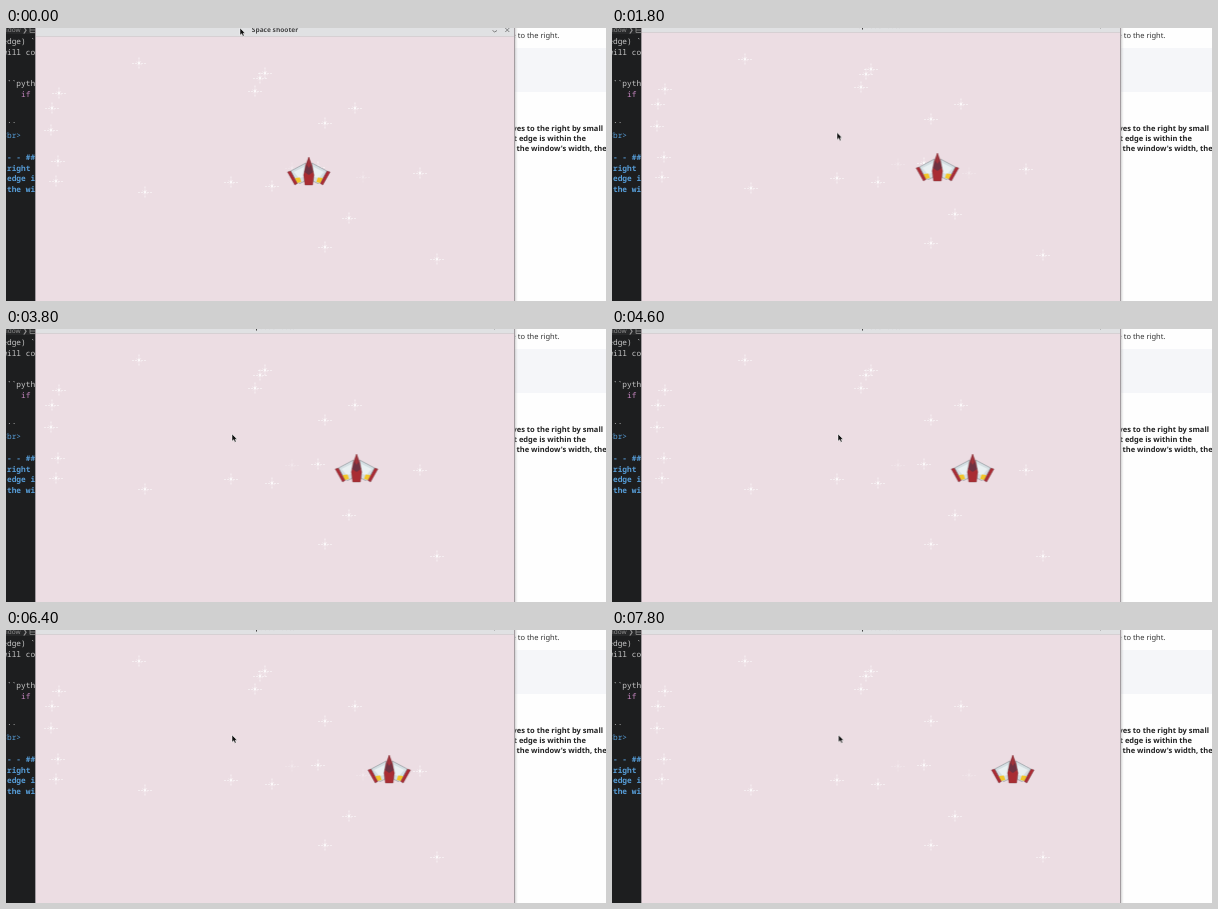
Write an HTML page that moves like this. It is 600 px wide and 273 px high and loops after 8000 ms.

```html
<!DOCTYPE html>
<html lang="en">
<head>
<meta charset="utf-8">
<title>Space shooter</title>
<style>
  html, body { margin: 0; width: 100%; height: 100%; overflow: hidden; background: #fefefe; }
  svg { display: block; width: 100vw; height: 100vh; }
  text { white-space: pre; text-rendering: geometricPrecision; }
  .code { font: 7.8px "Noto Sans Mono", monospace; fill: #c8c8c8; }
  .blue { fill: #569cd6; }
  .strong { font-weight: bold; }
  .prose { font: 7.52px "Noto Sans", sans-serif; fill: #333; }
  .prose .strong { fill: #222; }
  .title { font: bold 6.6px "Noto Sans", sans-serif; fill: #444; }

  .window { animation: drag 8s step-end infinite; }
  .ship { animation: fly 8s steps(40, end) infinite; }
  .pointer { animation: point 8s step-end infinite; }

  @keyframes drag {
    0% { transform: translateY(4px); }
    2.5% { transform: translateY(3px); }
    5% { transform: translateY(1px); }
    7.5%, 100% { transform: translateY(0); }
  }
  @keyframes fly {
    from { transform: translate(302.8px, 139px); }
    to { transform: translate(403.3px, 139px); }
  }
  @keyframes point {
    0% { transform: translate(234px, 0); }
    2.5% { transform: translate(234px, -1px); }
    5% { transform: translate(234px, -3px); }
    7.5% { transform: translate(234px, -4px); }
    12.5% { transform: translate(233px, 8px); }
    15% { transform: translate(230px, 42px); }
    17.5% { transform: translate(227px, 82px); }
    20% { transform: translate(225px, 104.5px); }
    27.5% { transform: translate(226px, 105px); }
    95%, 100% { transform: translate(226.5px, 105px); }
  }
</style>
</head>
<body>
<svg viewBox="0 0 600 273" preserveAspectRatio="none">
  <defs>
    <linearGradient id="shade">
      <stop offset="0" stop-color="#999" stop-opacity=".4"/>
      <stop offset="1" stop-color="#ccc" stop-opacity="0"/>
    </linearGradient>
    <g id="star" stroke="#fff" fill="#fff">
      <path d="M-7 .5H7M0-5.5V5.5" stroke-width="1.2" stroke-dasharray="2 1" opacity=".5"/>
      <path d="M-3-1.5L3 2M-2 2.5L2-2" opacity=".3"/>
      <circle r="1.2" stroke="none" opacity=".7"/>
    </g>
    <g id="wing">
      <path d="M-3-8L-18 0L-12 11L-9 12.5L-4 10Z" fill="#d5dfe3" stroke="#858d92" stroke-width=".6"/>
      <path d="M-5-4L-15 1L-10 7L-5 6Z" fill="#e9f0f2"/>
      <path d="M-14 7L-9 6.5L-7.5 11L-12 12Z" fill="#f2c62a"/>
      <path d="M-21.3 1L-18.3 0L-11.5 12.5L-14 14Z" fill="#ab2b34" stroke="#6a3a42" stroke-width=".4"/>
    </g>
  </defs>

  <rect width="600" height="273" fill="#fefefe"/>
  <rect width="30" height="273" fill="#1d1e1f"/>
  <rect width="30" height="6" fill="#272829"/>
  <text x="-4" y="4.2" class="prose" style="font-size:6.5px;fill:#909090">indow ❯</text>
  <path d="M24 0V4.5H29M24 2H29" fill="none" stroke="#909090" stroke-width=".8"/>

  <g class="code">
    <text x="-3.7" y="16">edge) `</text>
    <text x="-3.7" y="26.5">will co</text>
    <text x="1" y="58">``pyth</text>
    <text x="15" y="68.5" fill="#c586c0">if</text>
    <text x="1" y="95">..</text>
    <text x="-3.7" y="110" class="blue">&lt;br&gt;</text>
    <g class="blue strong">
      <text x="1" y="132">- - ##</text>
      <text x="1" y="142.5">right</text>
      <text x="1" y="153">edge i</text>
      <text x="1" y="163.5">the wi</text>
    </g>
  </g>

  <rect x="509" y="20" width="91" height="44" fill="#f5f6f9"/>
  <g class="prose">
    <text x="553.5" y="9.5" text-anchor="end">edge to the right.</text>
    <g class="strong">
      <text x="597" y="102.8" text-anchor="end">moves to the right by small</text>
      <text x="580" y="112.8" text-anchor="end">right edge is within the</text>
      <text x="510.5" y="123">the window's width, the</text>
    </g>
  </g>

  <g class="window">
    <rect x="509" y="-10" width="3" height="290" fill="url(#shade)"/>
    <rect x="29" y="-10" width="480" height="290" fill="#ecdde3"/>
    <rect x="29" y="-20" width="480" height="24.5" fill="#e0e1e3"/>
    <path d="M29 4.5H509" stroke="#d0cacd" stroke-width=".7"/>
    <path d="M29.5-10V280M508.5-10V280" stroke="#a39ca0"/>
    <text x="269" y=".2" class="title" text-anchor="middle">Space shooter</text>
    <path d="M486.5-1.5L488.7 0L491-1.5M499.3-4L503.3 0M503.3-4L499.3 0" fill="none" stroke="#666" stroke-width=".8"/>
    <g id="sky"></g>
    <g class="ship">
      <use href="#wing"/>
      <use href="#wing" transform="scale(-1 1)"/>
      <path d="M0-14L3-6L5.2 4L3.8 14H-3.8L-5.2 4L-3-6Z" fill="#a92d33" stroke="#7a3a40" stroke-width=".4"/>
      <path d="M0-13L2.6-5L4.3 1L0 4L-4.3 1L-2.6-5Z" fill="#6e3342"/>
      <path d="M0-14L1.8-6L0-3L-1.8-6Z" fill="#a3343b"/>
    </g>
  </g>

  <path class="pointer" d="M0 0V7.2L1.7 5.7L2.9 8.2L4.2 7.6L3.1 5.2H5.2Z" fill="#111" stroke="#fff" stroke-width=".5"/>
</svg>
<script>
  const stars = [
    [133, 31], [259, 41], [254, 46], [249, 59], [53, 61], [46, 76], [45, 98],
    [52, 129], [50, 149], [139, 160], [225, 150], [266, 154], [349, 76],
    [319, 91], [312, 135], [343, 186], [319, 215], [431, 227], [414, 141]
  ];
  const faintStars = [[286, 136], [357, 145]];
  const draw = (points, opacity) => points.map(([x, y]) =>
    `<use href="#star" x="${x}" y="${y}" opacity="${opacity}"/>`).join("");
  document.getElementById("sky").innerHTML = draw(stars, 1) + draw(faintStars, .35);
</script>
</body>
</html>
```
